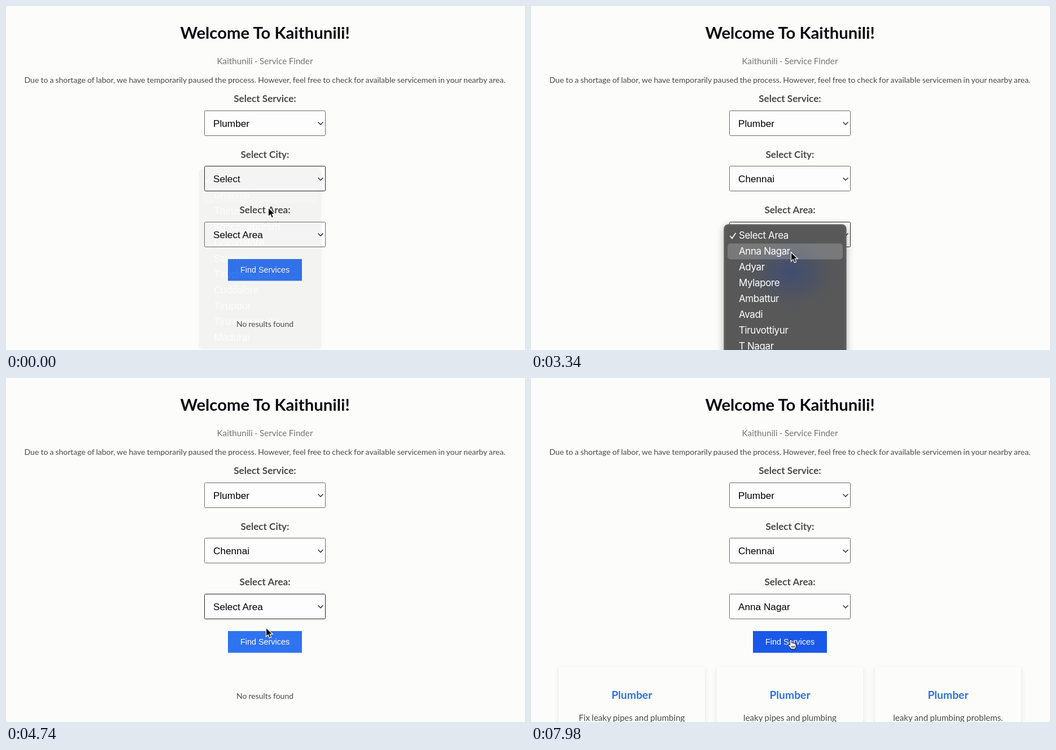
Write an HTML page that moves like this. It is 919x609 px and loops after 8000 ms.

```html
<!DOCTYPE html>
<html lang="en">
<head>
<meta charset="utf-8">
<title>Service Finder</title>
<style>
  html, body { margin: 0; width: 100%; height: 100%; overflow: hidden; background: #fcfcfb; }
  svg { display: block; width: 100%; height: 100%; }
  text { font-family: Lato, sans-serif; fill: #4a4a4a; }
  .mid { text-anchor: middle; }
  .title { font-size: 29.3px; font-weight: 700; fill: #0b0b10; }
  .subtitle { font-size: 15.2px; word-spacing: -.5px; fill: #757575; }
  .body { font-size: 14px; word-spacing: -.5px; }
  .label { font-size: 17.1px; font-weight: 700; }
  .value { font: 17.2px "Liberation Sans", sans-serif; fill: #000; }
  .button { font: 14.4px "Liberation Sans", sans-serif; fill: #fff; }
  .heading { font-size: 19.3px; font-weight: 700; fill: #2b72e8; }
  .desc { font-size: 15.1px; word-spacing: -.5px; }
  .menu text { font: 17px Inter, sans-serif; letter-spacing: -.4px; fill: #fff; }
  .box { fill: #fdfdfd; stroke: #6b6b6b; }
  .box.focus { stroke: #222; }
  .line { fill: none; stroke: #222; stroke-width: 1.3; }
  .card { fill: #fcfcfb; filter: drop-shadow(0 4px 4px rgba(0, 0, 0, .1)); }
  .panel { fill: #585858; stroke: #474747; filter: drop-shadow(0 3px 7px rgba(0, 0, 0, .3)); }
</style>
</head>
<body>
<svg id="stage" viewBox="0 0 919 609" preserveAspectRatio="none"></svg>
<script>
const LOOP = 8000;
const CENTER = 458.5;
const ROW = 28;

const CITY_FADE_END = 40, CITY_SET = 300;
const AREA_OPEN = 1450, AREA_FADE = 4240, AREA_FADE_END = 4550, AREA_SET = 4800;
const BUTTON_CLICK = 5900, RESULTS = 6080;

const cities = ["Select", "Chennai", "Thiruvallur", "Kancheepuram", "Coimbatore", "Salem",
  "Tiruchirappalli", "Cuddalore", "Tiruppur", "Tiruvannamalai", "Madurai"];
const areas = ["Select Area", "Anna Nagar", "Adyar", "Mylapore", "Ambattur", "Avadi",
  "Tiruvottiyur", "T Nagar"];

// time, x, y of the pointer tip
const pointerPath = [
  [0, 464.5, 357], [350, 466, 362], [1000, 470.5, 396], [2600, 470.5, 396],
  [2950, 460.5, 436], [4600, 460.5, 436], [4740, 460.5, 442], [5250, 460.5, 463], [LOOP, 460.5, 463]
];

const text = (cls, x, y, s) => `<text class="${cls}" x="${x}" y="${y}">${s}</text>`;
const centered = (cls, y, s, x = CENTER) => text("mid " + cls, x, y, s);

function field(id, label, top) {
  return centered("label", top - 14.5, label) +
    `<rect id="${id}Box" class="box" x="351.5" y="${Math.round(top) + .5}" width="214" height="44" rx="2"/>
     <path class="line" d="M552.5 ${top + 21}l4.5 4.5 4.5-4.5"/>
     <text id="${id}" class="value" x="367" y="${top + 29}"></text>`;
}

function menu(id, top, height, items, glow) {
  const rows = items.map((s, i) => text("", 368, top + 25 + i * ROW, s)).join("");
  return `<g id="${id}" class="menu">
    <rect class="panel" x="342" y="${top}" width="216" height="${height}" rx="7"/>
    ${glow ? '<ellipse cx="460" cy="472" rx="97" ry="72" fill="url(#glow)"/>' : ""}
    <rect x="343" y="${top + 1}" width="214" height="${height - 2}" rx="6" fill="none" stroke="#fff" stroke-opacity=".15"/>
    <rect id="${id}Row" x="348" width="204" height="${ROW}" rx="5" fill="#fff" fill-opacity=".2"/>
    <path d="M353 ${top + 20.5}l3 4 6-9" fill="none" stroke="#fff" stroke-width="1.7" stroke-linecap="round"/>
    ${rows}</g>`;
}

function card(x, desc) {
  return `<rect class="card" x="${x}" y="511" width="259" height="150" rx="4"/>` +
    centered("heading", 568, "Plumber", x + 129.5) +
    centered("desc", 606.5, desc, x + 129.5);
}

const el = id => document.getElementById(id);

el("stage").innerHTML = `
  <defs><radialGradient id="glow">
    <stop offset="0" stop-color="#414d70"/><stop offset=".4" stop-color="#48506a" stop-opacity=".75"/>
    <stop offset="1" stop-color="#585858" stop-opacity="0"/>
  </radialGradient></defs>
  <rect width="919" height="609" fill="#fcfcfb"/>` +
  centered("title", 58, "Welcome To Kaithunili!") +
  centered("subtitle", 102.5, "Kaithunili - Service Finder") +
  centered("body", 135.5, "Due to a shortage of labor, we have temporarily paused the process. " +
    "However, feel free to check for available servicemen in your nearby area.") +
  field("service", "Select Service:", 184.5) +
  field("city", "Select City:", 283) +
  field("area", "Select Area:", 381.5) +
  `<rect id="button" x="393" y="448" width="131" height="38.5"/>` +
  centered("button", 472, "Find Services") +
  `<g id="empty">${centered("body", 568, "No results found")}</g>
   <g id="results">${card(49, "Fix leaky pipes and plumbing")}${card(329, "leaky pipes and plumbing")}${
     card(609, "leaky and plumbing problems.")}</g>` +
  menu("cityMenu", 288, 319, cities, false) +
  menu("areaMenu", 387, 260, areas, true) +
  `<g id="pointer">
    <path id="arrow" d="M0 0V16l3.7-3.5 2.4 5.6 2.9-1.2-2.4-5.5h5.2z" stroke="#fff" stroke-width="1.2"/>
    <g id="hand" stroke="#000" stroke-linejoin="round">
      <path fill="#fff" d="M-2 1.4a1.6 1.6 0 0 1 3.2 0V6.2c1.2-.8 2.6-.3 2.9.6 1-.6 2.2 0 2.5.9 1.3-.3 2.2.5 2.2 1.7v3c0 2.2-1.4 2.9-1.6 4.6H0c-.6-2.2-4-4.5-5-6.8-.6-1.6 1.4-2.4 3-.4z"/>
      <path fill="none" d="M1.4 11v3.5M3.6 11v3.5M5.8 11v3.5"/>
    </g>
  </g>`;

el("service").textContent = "Plumber";
el("cityMenuRow").setAttribute("y", 321);

const clamp = v => Math.min(1, Math.max(0, v));
const show = (id, on) => el(id).setAttribute("visibility", on ? "visible" : "hidden");

function pointerAt(t) {
  const i = pointerPath.findIndex(p => p[0] > t);
  const [t0, x0, y0] = pointerPath[i - 1], [t1, x1, y1] = pointerPath[i];
  const u = (t - t0) / (t1 - t0), k = u * u * (3 - 2 * u);
  return [x0 + (x1 - x0) * k, y0 + (y1 - y0) * k];
}

function draw(t) {
  const [x, y] = pointerAt(t);
  const hover = y > 448;
  el("pointer").setAttribute("transform", `translate(${x} ${y})`);
  show("arrow", !hover);
  show("hand", hover);
  el("button").setAttribute("fill", hover ? "#1a58e8" : "#3073f0");

  el("city").textContent = cities[t < CITY_SET ? 0 : 1];
  el("area").textContent = areas[t < AREA_SET ? 0 : 1];
  el("cityBox").classList.toggle("focus", t < AREA_OPEN);
  el("areaBox").classList.toggle("focus", t >= AREA_OPEN && t < BUTTON_CLICK);

  el("cityMenu").setAttribute("opacity", .05 * clamp(1 - t / CITY_FADE_END));
  const fade = clamp((AREA_FADE_END - t) / (AREA_FADE_END - AREA_FADE));
  el("areaMenu").setAttribute("opacity", t < AREA_OPEN ? 0 : fade);
  el("areaMenuRow").setAttribute("y", y > 420 ? 420.5 : 392.5);

  show("empty", t < RESULTS);
  show("results", t >= RESULTS);
}

function tick() {
  draw(performance.now() % LOOP);
  requestAnimationFrame(tick);
}
tick();
</script>
</body>
</html>
```
